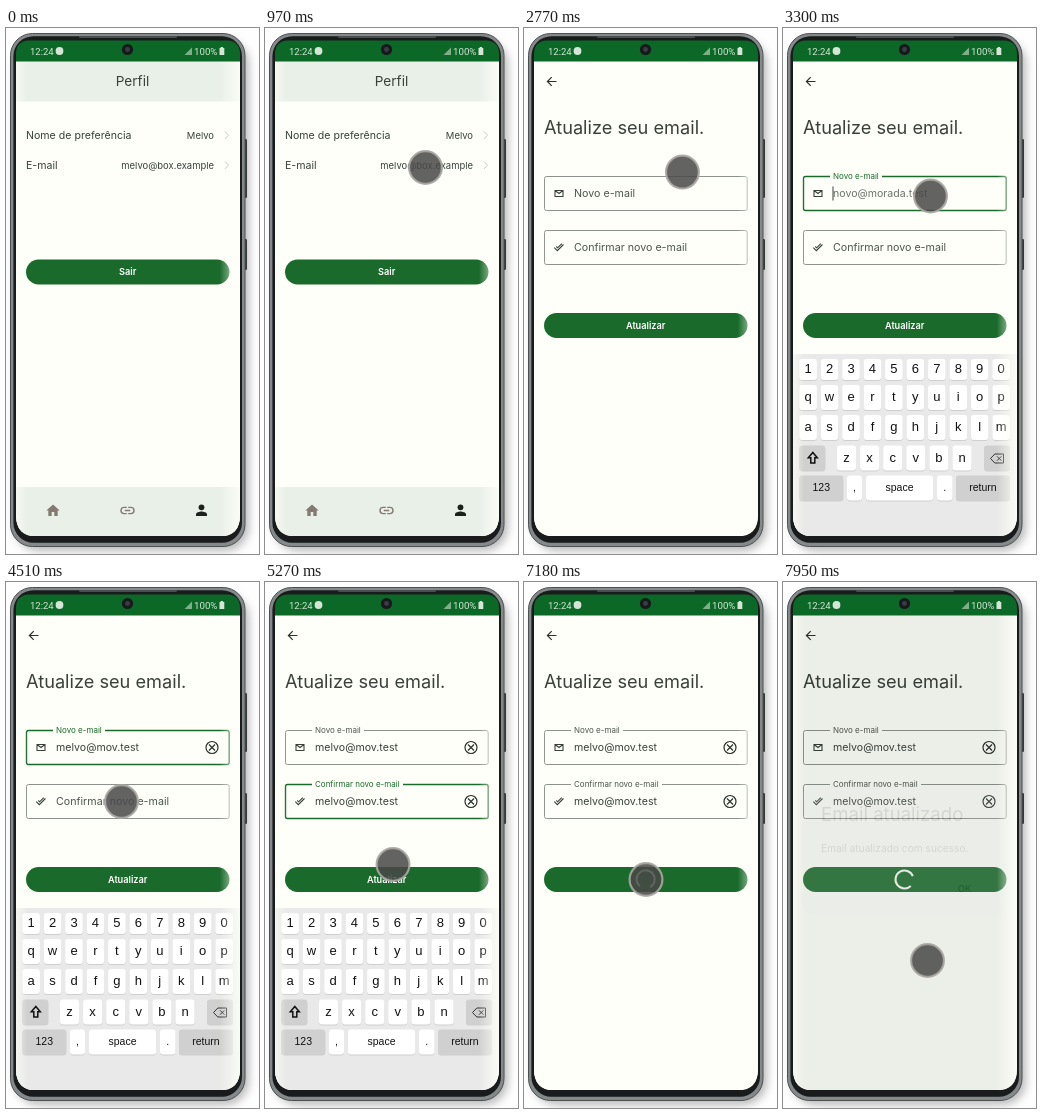
Animation, 253 px wide and 526 px high, one loop 8 s. Source, as an HTML page:

```html
<!DOCTYPE html>
<html lang="pt">
<head>
<meta charset="utf-8">
<style>
html, body { margin: 0; width: 100%; height: 100%; overflow: hidden; background: #fefefe; }
svg { display: block; width: 253px; height: 526px; }
text { font-family: Inter, 'Open Sans', sans-serif; white-space: pre; }
.sys { font-family: Roboto, sans-serif; }
.key { font-family: 'Liberation Sans', Arial, sans-serif; }
</style>
</head>
<body>
<script>
const LOOP = 8000;
const C = { bg: '#fdfff8', bar: '#e9f0e8', green: '#1a6b2b', ink: '#39413a', line: '#8d938c', hint: '#6d746d' };
const USER = { name: 'Melvo', mail: 'melvo@box.example', newMail: 'melvo@mov.test', hint: 'novo@morada.test' };

const text = (x, y, size, str, attrs = '') =>
  `<text x="${x}" y="${y}" font-size="${size}" fill="${C.ink}" ${attrs}>${str}</text>`;
const rect = (x, y, w, h, fill, attrs = '') =>
  `<rect x="${x}" y="${y}" width="${w}" height="${h}" fill="${fill}" ${attrs}/>`;
const line = (d, color, width = 1, attrs = '') =>
  `<path d="${d}" fill="none" stroke="${color}" stroke-width="${width}" ${attrs}/>`;
const middle = 'text-anchor="middle"';
const button = (y, label, id) => rect(20, y, 203.5, 25, C.green, 'rx="12.5"') +
  `<text id="${id}" x="121.7" y="${y + 15.7}" font-size="9.2" font-weight="600" fill="#fff" ${middle}>${label}</text>`;

function profilePage() {
  const row = (y, label, value) => text(20, y, 10.6, label) +
    text(208, y, 9.45, value, 'text-anchor="end"') +
    line(`M219 ${y - 7.5}l3.5 3.7-3.5 3.7`, '#a9aea8', 0.9);
  return rect(10, 33, 224, 475, C.bg) + rect(10, 33, 224, 40.5, C.bar) +
    text(126.5, 58, 13.6, 'Perfil', middle) +
    rect(10, 122, 224, 31, '#dfe1db', 'id="pressed"') +
    row(111, 'Nome de preferência', USER.name) + row(141, 'E-mail', USER.mail) +
    button(231.5, 'Sair', 'exit');
}

function navBar() {
  const brown = '#857a73';
  return `<g id="nav">${rect(10, 459, 224, 49, C.bar)}
    <path d="M45.7 488v-4h2.6v4h3.4v-5.6h2l-6.7-6-6.7 6h2v5.6z" fill="${brown}"/>
    ${line('M120.8 479.4h-2.7a3.1 3.1 0 0 0 0 6.2h2.7M122.2 479.4h2.7a3.1 3.1 0 0 1 0 6.2h-2.7M118.8 482.5h5.4', brown, 1.4)}
    <circle cx="195.5" cy="479.3" r="2.9" fill="#1c211c"/>
    <path d="M190 488v-1.6c0-2 3.6-2.9 5.5-2.9s5.5.9 5.5 2.9v1.6z" fill="#1c211c"/></g>`;
}

function field(id, y, label, notch, icon) {
  return `<rect id="${id}Box" x="20.5" y="${y}" width="202.7" height="34" rx="2" fill="none"/>
    ${rect(47, y - 2, notch, 4, C.bg, `id="${id}Notch"`)}
    ${line(icon, C.ink, 1.1)}
    <text id="${id}Label" x="50">${label}</text>
    <text id="${id}Value" x="50" y="${y + 20.5}" font-size="10.6"></text>
    ${rect(49.5, y + 10, 1, 14, C.ink, `id="${id}Caret"`)}
    <g id="${id}Clear"><circle cx="206" cy="${y + 17}" r="6" fill="none" stroke="#2b302b" stroke-width="1.2"/>
    ${line(`M203 ${y + 14}l6 6m0-6l-6 6`, '#2b302b', 1.2)}</g>`;
}

function updatePage() {
  return rect(10, 33, 224, 475, C.bg) +
    line('M32.5 53.5h-9m4.2-4.3l-4.3 4.3 4.3 4.3', '#2b302b', 1.2) +
    text(20, 106, 18.2, 'Atualize seu email.') +
    field('a', 148.5, 'Novo e-mail', 52, 'M31 162.5h8v6h-8zl4 3 4-3') +
    field('b', 202.5, 'Confirmar novo e-mail', 91, 'M30.3 219.7l3 3 6.2-6.2M32.3 218.5l1.3 1.300 4.200-4.200') +
    button(285, 'Atualizar', 'send') +
    line('M129.8 294a9 9 0 1 0-2 10', '#f4f8f2', 2, 'id="spinner"');
}

function keyboard() {
  const key = (x, y, w, h, label, fill = '#fff', size = 13) => rect(x, y + 1, w, h, '#cfcfcf', 'rx="3"') +
    rect(x, y, w, h, fill, 'rx="3"') +
    `<text class="key" x="${x + w / 2}" y="${y + h / 2 + size * 0.35 - 0.7}" font-size="${size}" fill="#111" ${middle}>${label}</text>`;
  const row = (chars, x, y, pitch, w, h) =>
    [...chars].map((c, i) => key(x + i * pitch, y, w, h, c)).join('');
  const word = (x, w, label, fill) => key(x, 447.500, w, 25, label, fill, 10.5);
  const grey = '#d0d0d0';
  return rect(10, 326, 224, 182, '#e9e9e9') +
    row('1234567890', 16.3, 331, 21.45, 17.6, 21) +
    row('qwertyuiop', 16.3, 357, 21.45, 17.6, 25) +
    row('asdfghjklm', 16.3, 387, 21.45, 17.6, 25) +
    key(16.3, 417.5, 26, 25, '', grey) + row('zxcvbn', 54, 417.5, 23.1, 19, 25) +
    key(201, 417.5, 26, 25, '', grey) +
    line('M29.8 424.5l-4.5 5.2h2.5v5.300h4v-5.300h2.500z', '#111', 1.5) +
    line('M207.500 430.500l4.300-4.500h8.700v9h-8.700zM214 428.300l4.400 4.400m0-4.400l-4.400 4.400', '#333', 1) +
    word(16.3, 44, '123', grey) + word(64, 15, ',') + word(83, 67, 'space') +
    word(154, 15.5, '.') + word(173, 54, 'return', grey);
}

const dialog = () => rect(18, 204, 208, 130, C.bar, 'rx="14"') +
  text(38, 239, 18.6, 'Email atualizado') +
  text(38, 270, 10.2, 'Email atualizado com sucesso.') +
  text(181.5, 309.5, 9.5, 'OK', middle);

function statusBar() {
  const pale = '#d5e6d7';
  return rect(10, 10, 224, 23.5, '#0c6826') +
    `<text class="sys" x="24" y="27" font-size="9.5" fill="${pale}">12:24</text>
    <circle cx="53.5" cy="23" r="3.9" fill="${pale}"/>
    <path d="M178.5 27h7.5v-7.5z" fill="#7fae88"/>
    <text class="sys" x="188" y="27" font-size="9.7" fill="${pale}">100%</text>
    <path d="M213.5 20h1.2v-1h2.4v1h1.2v7h-4.8z" fill="${pale}"/>
    <circle cx="121.5" cy="21.5" r="5.6" fill="#17191d"/>
    <circle cx="121.5" cy="21.5" r="2.4" fill="#3a3d48"/>`;
}

const stops = list => list.map(([o, c, a = 1]) => `<stop offset="${o}" stop-color="${c}" stop-opacity="${a}"/>`).join('');

document.body.innerHTML = `<svg viewBox="0 0 253 526">
  <defs>
    <clipPath id="screen"><path d="M10 26q0-13 13-13.5h198q13 .5 13 13.5v461q0 21-20 21.5h-184q-20-.5-20-21.5z"/></clipPath>
    <linearGradient id="edge">${stops([[0, C.bg, 0.6], [0.05, C.bg, 0], [0.91, C.bg, 0], [1, C.bg, 0.85]])}</linearGradient>
    <filter id="blur" x="-20%" y="-20%" width="140%" height="140%"><feGaussianBlur stdDeviation="4"/></filter>
  </defs>
  ${rect(0, 0, 253, 526, '#fefefe')}
  ${rect(9, 12, 234, 511, '#777', 'rx="24" opacity=".5" filter="url(#blur)"')}
  ${rect(237, 111, 4, 59, '#34383a', 'rx="1.2"')}${rect(237, 211, 4, 31, '#34383a', 'rx="1.2"')}
  ${rect(4.5, 5.5, 234.5, 513, '#85898a', 'rx="22" stroke="#4c5051"')}
  ${rect(7.4, 8.2, 228.6, 506.5, '#191b1c', 'rx="20"')}
  ${rect(73, 8, 98, 2, '#4a4e50', 'rx="1"')}
  <g clip-path="url(#screen)">
    <g id="profile">${profilePage()}</g>${navBar()}
    <g id="update">${updatePage()}</g>
    <g id="keys">${keyboard()}</g>
    ${rect(10, 33, 224, 475, '#000', 'id="scrim"')}
    <g id="dialog">${dialog()}</g>
    ${rect(10, 33.5, 224, 475, 'url(#edge)')}
    ${statusBar()}
  </g>
  <circle id="cursor" r="16.4" fill="#484848" fill-opacity=".85" stroke="#aaa7a3" stroke-width="2.2" stroke-opacity=".9"/>
</svg>`;

const el = {};
document.querySelectorAll('[id]').forEach(n => el[n.id] = n);
const set = (id, attrs) => { for (const k in attrs) el[id].setAttribute(k, attrs[k]); };
const show = (id, on) => set(id, { visibility: on ? 'inherit' : 'hidden' });

const progress = (t, from, to) => Math.min(1, Math.max(0, (t - from) / (to - from)));
const easeInOut = p => p < 0.5 ? 2 * p * p : 1 - 2 * (1 - p) ** 2;
const easeOut = p => 1 - (1 - p) ** 2;
const mix = (a, b, p) => a + (b - a) * p;

// Each move: start, end, destination.
const START = [276, 548];
const MOVES = [
  [90, 650, 162.5, 128.5], [800, 960, 160.5, 139.5],
  [1170, 1540, 162.5, 195.5], [1670, 2050, 160.5, 139.5],
  [2700, 2950, 147.5, 168],
  [3960, 4250, 131, 302], [4260, 4500, 115.5, 219.5],
  [4800, 5090, 128, 281.5], [5220, 5270, 128, 282.5],
  [5740, 5790, 130, 302], [5790, 5970, 168, 171.5],
  [6070, 6280, 122.5, 262.5], [6340, 6620, 122, 297.5],
  [7230, 7700, 144.5, 378.5]
];
function cursorAt(t) {
  let [x, y] = START;
  for (const [from, to, tx, ty] of MOVES) {
    if (t < from) break;
    const p = easeInOut(progress(t, from, to));
    x = mix(x, tx, p);
    y = mix(y, ty, p);
  }
  return [x, y];
}

function drawField(id, y, t, focus, paste, blur) {
  const focused = t >= focus && t < blur;
  const pasted = t >= paste;
  const lift = easeOut(progress(t, focus, focus + 150));
  const color = focused ? C.green : C.line;
  set(id + 'Box', { stroke: color, 'stroke-width': focused ? 1.4 : 1 });
  set(id + 'Label', {
    y: mix(y + 20.2, y + 2, lift),
    'font-size': mix(10.7, 8, lift),
    fill: focused ? C.green : '#4d554e'
  });
  set(id + 'Value', { fill: pasted ? C.ink : C.hint });
  el[id + 'Value'].textContent = pasted ? USER.newMail : lift === 1 ? USER.hint : '';
  show(id + 'Notch', lift > 0.6);
  show(id + 'Caret', focused && !pasted && t < focus + 560);
  show(id + 'Clear', pasted);
}

function draw(t) {
  const slide = easeInOut(progress(t, 2221, 2611));
  set('profile', { transform: `translate(${-43 * slide} 0)` });
  set('update', { transform: `translate(${224 * (1 - slide)} 0)` });
  show('nav', t < 2221);
  show('pressed', t >= 2190);
  show('update', slide > 0);

  drawField('a', 148.5, t, 3070, 4060, 4720);
  drawField('b', 202.5, t, 4720, 5270, 5790);

  const raised = easeOut(progress(t, 3020, 3290)) - easeInOut(progress(t, 6110, 6448));
  set('keys', { transform: `translate(0 ${182 * (1 - raised)})` });
  show('keys', raised > 0);

  const loading = t >= 7180;
  show('send', !loading);
  show('spinner', loading);
  set('spinner', { transform: `rotate(${(t - 7950) * 0.36} 121.7 297.5)` });

  const fade = progress(t, 7870, 7945);
  set('scrim', { opacity: 0.065 * fade });
  set('dialog', { opacity: 0.13 * fade });

  const [x, y] = cursorAt(t);
  set('cursor', { cx: x, cy: y });
  show('cursor', t >= 130);
}

const began = performance.now();
function tick() {
  draw((performance.now() - began) % LOOP);
  requestAnimationFrame(tick);
}
tick();
</script>
</body>
</html>
```
